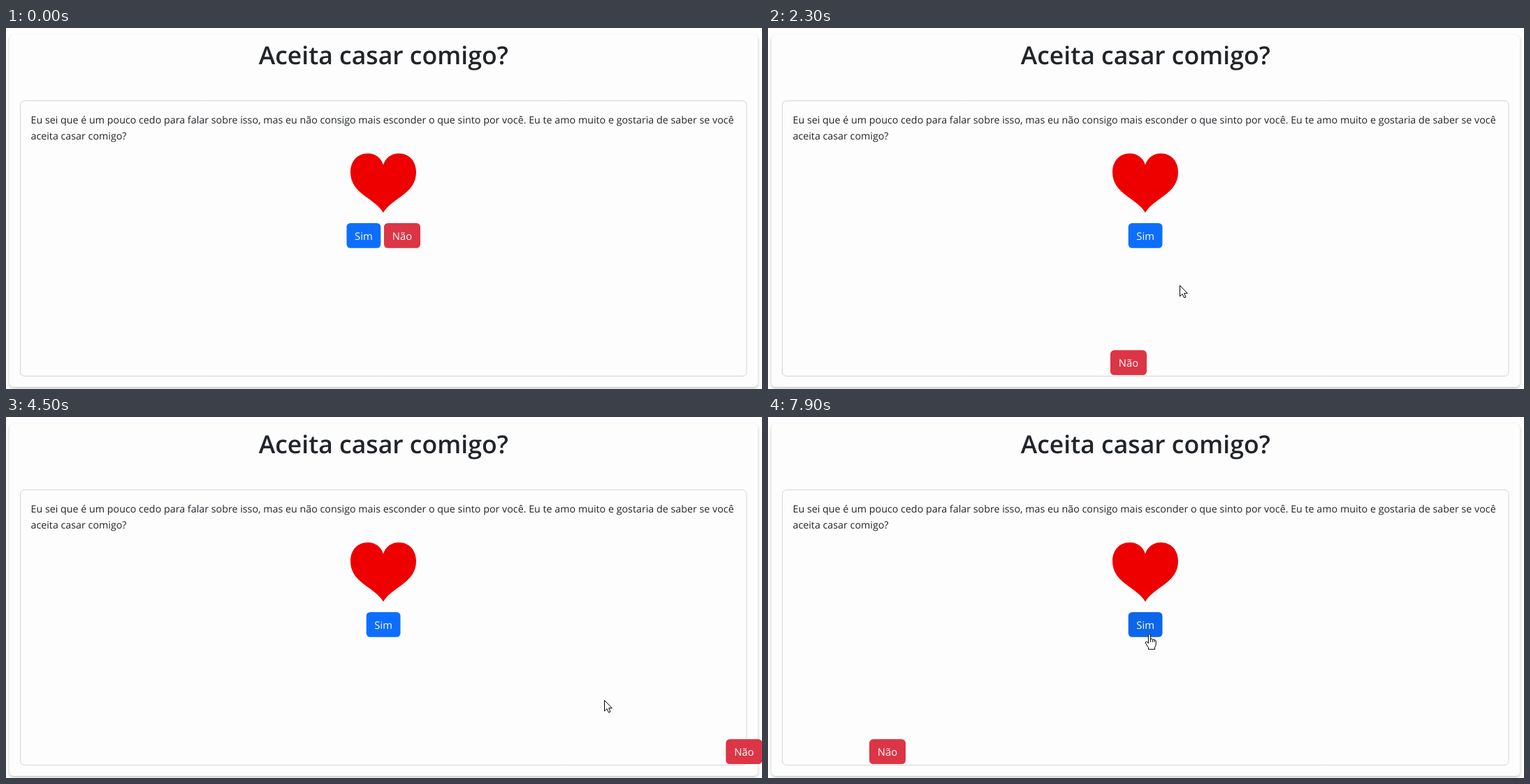
Write an HTML page with a canvas that moves like this. It is 1082 px wide and 518 px high and loops after 8 s.

```html
<!DOCTYPE html>
<html lang="pt">
<head>
<meta charset="utf-8">
<style>
html, body { margin: 0; width: 100%; height: 100%; overflow: hidden; background: #fdfdfd; }
canvas { display: block; }
</style>
</head>
<body>
<canvas id="stage" width="1082" height="518"></canvas>
<script>
const ctx = document.getElementById('stage').getContext('2d');
const LOOP = 8000, STEP = 100;
const FONT = '"Open Sans", "Noto Sans", sans-serif';
const INK = '#212529', BODY = 14.29;
const APPEAR = 2, HAND_STEPS = 2;

// Pointer moves: arrival step, steps taken, x, y; it rests in between
const moves = [
  [2, 1, 19, 36], [4, 2, 480, 363], [8, 3, 319, 421], [11, 3, 565, 346],
  [14, 3, 571, 320], [17, 1, 574, 311], [23, 4, 589, 369], [28, 5, 534, 472],
  [32, 2, 648, 445], [34, 1, 726, 394], [38, 3, 750, 350], [45, 5, 856, 406],
  [47, 2, 910, 430], [53, 5, 1016, 470], [56, 1, 1042, 473], [62, 4, 761, 433],
  [66, 3, 628, 427], [72, 6, 546, 370], [74, 2, 545, 337], [79, 4, 546, 311]
];

// The "no" button takes the next of these places whenever the pointer touches it
const LOW = 462.3;
const places = [[541, 280], [490, LOW], [734.5, 318], [1030.3, LOW], [145, LOW]];
const SIZE = { yes: 48.8, no: 52, h: 35.8 };

const heart = new Path2D('M540 196.5C537 186 528 180 518 180C503 180 493 191 493 207' +
  'C493 238 528 244 540 265C552 244 587 238 587 207C587 191 577 180 562 180C552 180 543 186 540 196.5Z');
const arrow = new Path2D('M.5 .5V16L4.1 12.7L6.5 18L9 17L6.7 11.7H11.3Z');
const hand = new Path2D('M-1.6 1.6Q0 -.6 1.6 1.6V7.8Q3.4 6.4 4.4 8.2Q6.2 7.2 7 9Q9.3 8.6 9.3 11' +
  'V15Q9.3 17 7.6 19.4V22.3H-1.6V19.8L-5.3 14Q-6.3 11.3 -4.4 11.3Q-3 11.5 -1.6 13.8Z');
const knuckles = new Path2D('M1.6 7.8V12M4.4 8.4V12M7 9.2V12');

function pointer(s) {
  const i = moves.findIndex(m => m[0] >= s);
  const [end, steps, x, y] = moves[i];
  const [, , fromX, fromY] = moves[Math.max(i - 1, 0)];
  const u = Math.max(0, 1 - (end - s) / steps);
  return { x: Math.round(fromX + (x - fromX) * u), y: Math.round(fromY + (y - fromY) * u) };
}

const touches = (p, x, y, w) => p.x >= x && p.x <= x + w && p.y >= y && p.y <= y + SIZE.h;

// Play the chase once, keeping the state at every step
function chase() {
  const states = [];
  let place = 0, fled = -Infinity;
  for (let s = 0; s < LOOP / STEP; s++) {
    const at = pointer(s);
    if (touches(at, ...places[place], SIZE.no)) {
      place++;
      fled = s;
    }
    const yesX = place ? 515.7 : 487.5;
    const hover = touches(at, yesX, 280, SIZE.yes);
    const pointing = hover || (s > fled && s <= fled + HAND_STEPS);
    states.push({ at, no: places[place], yesX, hover, pointing, visible: s >= APPEAR });
  }
  return states;
}

function box(x, y, w, h, r) {
  ctx.beginPath();
  ctx.roundRect(x, y, w, h, r);
}

function text(str, x, y, size, color, align = 'left', weight = 400) {
  ctx.font = `${weight} ${size}px ${FONT}`;
  ctx.textRendering = 'geometricPrecision';
  ctx.textAlign = align;
  ctx.fillStyle = color;
  ctx.fillText(str, x, y);
}

function button(label, x, y, w, color) {
  box(x, y, w, SIZE.h, 5.5);
  ctx.fillStyle = color;
  ctx.fill();
  text(label, x + w / 2, y + 23.7, 14.8, '#fff', 'center');
}

function page() {
  ctx.fillStyle = '#fdfdfd';
  ctx.fillRect(0, 0, 1082, 518);
  ctx.save();
  ctx.shadowColor = 'rgba(0,0,0,.22)';
  ctx.shadowBlur = 4;
  ctx.shadowOffsetY = 2;
  box(5, 10, 1071, 505, 6);
  ctx.fill();
  ctx.restore();
  box(20.5, 104.5, 1039.5, 395, 6);
  ctx.strokeStyle = '#d4d4d4';
  ctx.lineWidth = 1;
  ctx.stroke();
  text('Aceita casar comigo?', 540.2, 52, 35.6, INK, 'center', 600);
  text('Eu sei que é um pouco cedo para falar sobre isso, mas eu não consigo mais ' +
    'esconder o que sinto por você. Eu te amo muito e gostaria de saber se você', 35.5, 137, BODY, INK);
  text('aceita casar comigo?', 35.5, 160, BODY, INK);
  ctx.fillStyle = '#ee0000';
  ctx.fill(heart);
}

function cursor({ x, y }, pointing) {
  const shape = pointing ? hand : arrow;
  ctx.save();
  ctx.translate(x, y);
  ctx.fillStyle = '#fff';
  ctx.strokeStyle = '#000';
  ctx.lineWidth = 1;
  ctx.fill(shape);
  ctx.stroke(shape);
  if (pointing) ctx.stroke(knuckles);
  ctx.restore();
}

const states = chase();
const start = performance.now();

function loop() {
  const t = (performance.now() - start) % LOOP;
  const { at, no, yesX, hover, pointing, visible } = states[Math.floor(t / STEP)];
  page();
  button('Sim', yesX, 280, SIZE.yes, hover ? '#0c66ea' : '#0d6efd');
  button('Não', ...no, SIZE.no, '#dc3545');
  if (visible) cursor(at, pointing);
  requestAnimationFrame(loop);
}
loop();
</script>
</body>
</html>
```
